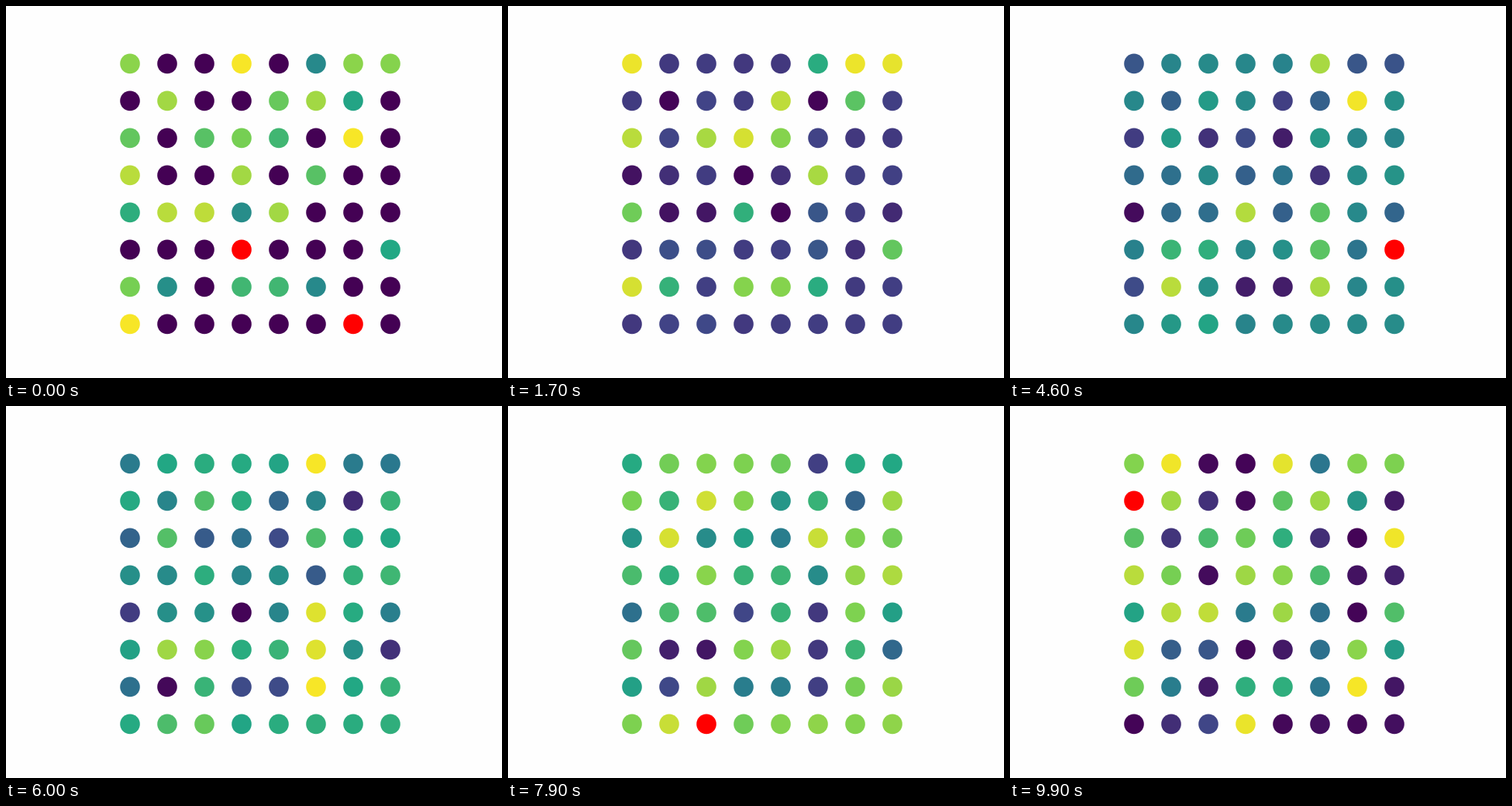
Animation, 640 px wide and 480 px high, one loop 10 s. Source, as an HTML page with a canvas:

```html
<!DOCTYPE html>
<html lang="en">
<head>
<meta charset="utf-8">
<title>Firing oscillators</title>
<style>
  html, body { margin: 0; width: 100%; height: 100%; overflow: hidden; background: #fefefe; }
  canvas { display: block; }
</style>
</head>
<body>
<canvas id="stage" width="640" height="480"></canvas>
<script>
const ctx = document.getElementById('stage').getContext('2d');
const STEP = 100, STEPS = 100;
const PERIOD = 97;        // steps between two firings of a cell
const FIRST_RISE = 115;   // rise time of cells that start partly charged
const LAST_CHARGED = 61;  // cells that fire later than this start empty

const ramp = ['440154', '414487', '2a788e', '22a884', '7ad151', 'fde725']
  .map(hex => [0, 2, 4].map(i => parseInt(hex.slice(i, i + 2), 16)));

// Initial state of the grid: the step at which each cell first fires.
const firstFire = [
  [20, 101, 97, 1, 103, 61, 20, 21],
  [99, 16, 85, 97, 28, 16, 48, 92],
  [29, 84, 32, 24, 38, 86, 1, 101],
  [12, 125, 96, 16, 120, 32, 94, 90],
  [43, 12, 11, 59, 16, 63, 98, 140],
  [105, 70, 73, 0, 92, 63, 120, 46],
  [24, 58, 92, 38, 38, 61, 100, 93],
  [1, 86, 79, 102, 97, 95, 0, 95]
];

function rampColor(charge) {
  const x = charge * (ramp.length - 1);
  const i = Math.floor(x);
  const mix = ramp[i].map((c, k) => Math.round(c + (ramp[i + 1][k] - c) * (x - i)));
  return `rgb(${mix})`;
}

function cellColor(first, step) {
  const age = step - first;
  if (age < 0) return rampColor(1 + age / (first > LAST_CHARGED ? first : FIRST_RISE));
  return age % PERIOD ? rampColor(age % PERIOD / PERIOD) : '#f00';
}

function draw(now) {
  const step = Math.floor(now / STEP) % STEPS;
  ctx.fillStyle = '#fefefe';
  ctx.fillRect(0, 0, 640, 480);
  firstFire.forEach((cells, row) => cells.forEach((first, col) => {
    ctx.fillStyle = cellColor(first, step);
    ctx.beginPath();
    ctx.arc(160 + col * 48, 74.4 + row * 48, 12.8, 0, 2 * Math.PI);
    ctx.fill();
  }));
}

function frame() {
  draw(performance.now());
  requestAnimationFrame(frame);
}
frame();
</script>
</body>
</html>
```
